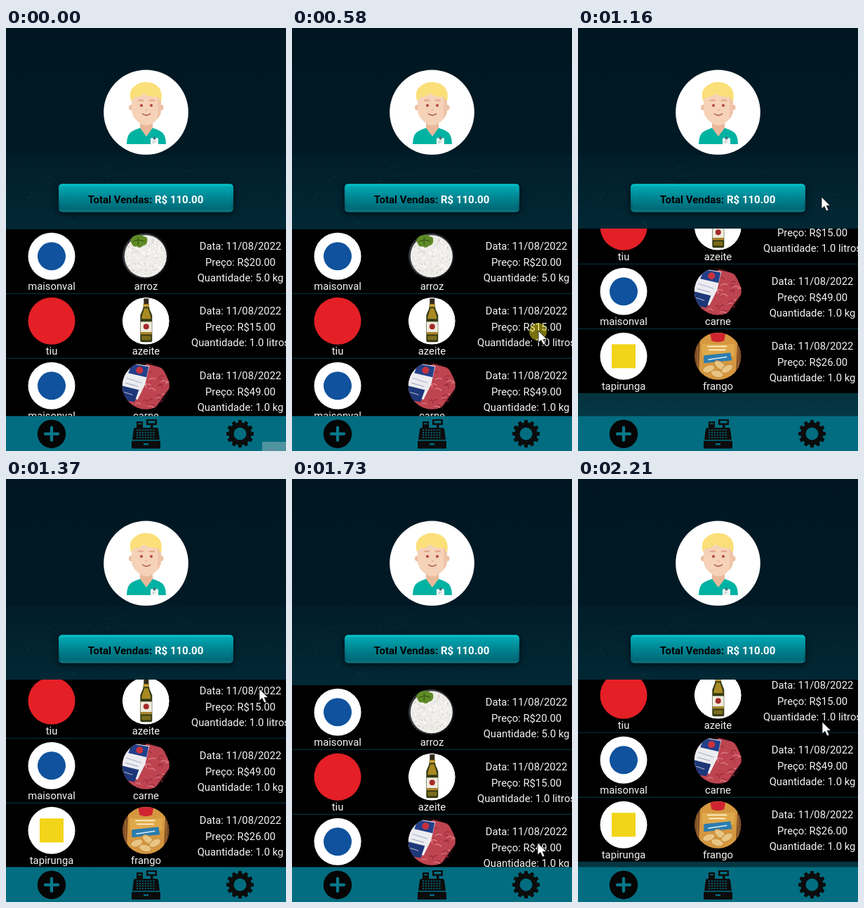
Animation of 399 by 601 pixels, one loop 2240 ms. Source, as an HTML page:

```html
<!DOCTYPE html>
<html lang="pt">
<head>
<meta charset="utf-8">
<title>Vendas</title>
<style>
html, body { margin: 0; width: 100%; height: 100%; overflow: hidden; background: #001722; }
svg { display: block; width: 399px; height: 601px; }
text { font-family: Roboto, "Noto Sans", sans-serif; font-size: 14.8px; fill: #f4f4f4; text-anchor: middle; white-space: pre; }
.total { font-size: 15px; font-weight: 700; fill: #fff; }
</style>
</head>
<body>
<svg id="stage" viewBox="0 0 399 601" width="399" height="601"></svg>
<script>
const LOOP = 2240, ROW = 92, LIST_TOP = 286;

// Waypoints: time followed by values
const scrollPath = [
  [0, 0], [870, 0], [960, -58], [1050, -118], [1110, -137], [1160, -134],
  [1230, -114], [1300, -103], [1370, -101], [1430, -84], [1560, 6], [1640, 20],
  [1690, 14], [1730, 7], [1790, 0], [1880, 0], [2000, -55], [2110, -100], [2210, -109], [2240, -110]
];
const cursorPath = [
  [0, 410, 612], [30, 400, 600], [210, 372, 520], [420, 352, 436], [540, 351, 430],
  [580, 351, 430], [830, 348, 428], [870, 348, 426], [960, 347, 368], [1100, 347, 239],
  [1160, 347, 240], [1260, 356, 262], [1370, 361, 298], [1430, 359, 320], [1640, 351, 505],
  [1730, 350, 517], [1880, 350, 515], [2000, 349, 450], [2110, 348, 376], [2210, 348, 345], [2240, 348, 342]
];

function sample(path, t) {
  let i = 1;
  while (i < path.length - 1 && path[i][0] < t) i++;
  const a = path[i - 1], b = path[i];
  const k = Math.min(1, Math.max(0, (t - a[0]) / (b[0] - a[0])));
  return a.slice(1).map((v, j) => v + (b[j + 1] - v) * k);
}

function random(seed) {
  return () => (seed = (seed * 16807) % 2147483647) / 2147483647;
}

const circle = (x, y, r, fill, extra = '') => `<circle cx="${x}" cy="${y}" r="${r}" fill="${fill}" ${extra}/>`;
const rect = (x, y, w, h, fill, extra = '') => `<rect x="${x}" y="${y}" width="${w}" height="${h}" fill="${fill}" ${extra}/>`;
const path = (d, fill, extra = '') => `<path d="${d}" fill="${fill}" ${extra}/>`;
const line = (d, stroke, width, extra = '') => `<path d="${d}" fill="none" stroke="${stroke}" stroke-width="${width}" ${extra}/>`;
const label = (x, y, s) => `<text x="${x}" y="${y}">${s}</text>`;
const gradient = (id, stops) => `<linearGradient id="${id}" x1="0" y1="0" x2="0" y2="1">` +
  stops.map(([o, c]) => `<stop offset="${o}" stop-color="${c}"/>`).join('') + '</linearGradient>';

// Products are drawn around (0, 0) inside a disc of radius 33.5
function rice() {
  const rnd = random(71);
  let s = circle(0, 0, 33.5, '#090a0c') + circle(-1.5, -.5, 32, '#35383c') + circle(-.5, 0, 30, '#eeece8');
  for (let i = 0; i < 150; i++) {
    const a = rnd() * 6.283, r = Math.sqrt(rnd()) * 28, tilt = rnd() * 6.283;
    const x = r * Math.cos(a), y = r * Math.sin(a);
    const dx = 2.4 * Math.cos(tilt), dy = 2.4 * Math.sin(tilt);
    s += line(`M${x.toFixed(1)} ${y.toFixed(1)}l${dx.toFixed(1)} ${dy.toFixed(1)}`,
      ['#fff', '#fafaf6', '#d5d2ca'][i % 3], 1.2, 'stroke-linecap="round"');
  }
  return s + path('M-22-22q2-8 10-8q6-2 9 2q6 0 5 6q0 6-6 7q-4 5-9 1q-6 2-9-8z', '#5f8a26') +
    line('M-18-21q8-4 16 0m-9-6v11', '#35590f', 1.2);
}

function oil() {
  return circle(0, 0, 33.5, '#fff') +
    path('M-3.500-24h8q0 7 2.500 11l2 5v36q0 2-2.500 2h-12q-2.500 0-2.500-2v-36l2-5q2.500-4 2.500-11z', '#353a14') +
    path('M-2-18h5l3 9q1 3 1 6h-13q0-3 1-6z', '#a98a22') +
    rect(-3, -32, 7, 9, '#33291a') + rect(-3.5, -24, 8, 4, '#c79c34') +
    rect(-7.5, 1, 16, 15, '#efebdc') + circle(.5, 8, 4, '#a52b2b') +
    rect(-7.5, 16, 16, 3, '#b18a2c') + rect(-6, 21, 13, 6, '#7c6c1c');
}

function meat() {
  const rnd = random(19);
  let s = circle(0, 0, 33.5, '#16080b') + path('M-34-14L2-31L24-25L36 0L10 36L-34 30z', '#bd4450');
  for (let i = 0; i < 40; i++) {
    const x = rnd() * 62 - 28, y = rnd() * 52 - 20;
    s += line(`M${x.toFixed(1)} ${y.toFixed(1)}q5-4 ${(5 + rnd() * 6).toFixed(1)} ${(rnd() * 7 - 2).toFixed(1)}`,
      i % 2 ? '#df818a' : '#9c2a3a', 1.2);
  }
  return s + path('M-34-13L-21-32L5-28L-1-2L-12 20L-34 8z', '#ececf0') +
    path('M-20-31L4-27L1-12L-25-18z', '#233f8a') + circle(-9, -22, 5, '#c8323c') +
    path('M-34 0L-10 6L-16 23L-34 20z', '#1d3779') +
    line('M-28-11l22 7m-23 0l18 5m-20 8l12 4', '#a9b2cc', 1.2);
}

function chicken() {
  return circle(0, 0, 33.5, '#7a4a26') + path('M-25-34h50l3 10-2 44-3 14h-46l-4-16z', '#d5973f') +
    path('M-23-17h47l-1 17h-45z', '#dfa94b') +
    path('M-20-1L18-5l2 11L-20 10z', '#2c7cae') + path('M-11-33h22l-2 11q-9 4-18 0z', '#cf2430') +
    line('M-15-14h28m-26 5h24', '#fff2ce', 1.8) + line('M-14 5l27-4', '#d9edf5', 1.4) +
    [[-13, 18, -20], [3, 13, 35], [13, 18, -30], [-1, 25, 15]].map(([x, y, a]) =>
      `<ellipse cx="${x}" cy="${y}" rx="9" ry="5" fill="#e9c583" stroke="#c48c3e" transform="rotate(${a} ${x} ${y})"/>`).join('') +
    line('M-29-15v38m58-36v40', '#9b642f', 2);
}

const white = circle(0, 0, 33.5, '#fff');
const blueMark = white + circle(0, 0, 20, '#10529d');
const redMark = circle(0, 0, 33.5, '#e41f26');
const yellowMark = white + rect(-17, -17, 34, 34, '#f2d418');

const sales = [
  ['maisonval', blueMark, 'arroz', rice(), '20.00', '5.0 kg'],
  ['tiu', redMark, 'azeite', oil(), '15.00', '1.0 litros'],
  ['maisonval', blueMark, 'carne', meat(), '49.00', '1.0 kg'],
  ['tapirunga', yellowMark, 'frango', chicken(), '26.00', '1.0 kg']
];

function saleRow([shop, mark, item, picture, price, amount], i) {
  return `<g transform="translate(0 ${i * ROW})">` + rect(0, 0, 399, 90.7, '#000') +
    `<g transform="translate(65 38.3)">${mark}</g>` +
    `<g transform="translate(199.3 38.3)" clip-path="url(#disc)">${picture}</g>` +
    label(65, 86, shop) + label(199.5, 86, item) +
    label(334, 29.3, 'Data: 11/08/2022') + label(334, 52, 'Preço: R$' + price) +
    label(334, 74.3, 'Quantidade: ' + amount) + '</g>';
}

function background() {
  const rnd = random(5);
  let s = rect(0, 0, 399, 180, 'url(#night)') + rect(0, 180, 399, 421, 'url(#glow)');
  for (let i = 0; i < 18; i++) {
    const x = rnd() * 399, y = 195 + rnd() * 90;
    s += line(`M${x.toFixed(0)} ${y.toFixed(0)}l${(rnd() * 80 - 40).toFixed(0)} ${(rnd() * 36 - 18).toFixed(0)}`,
      '#1c6573', .7, 'opacity=".14"') + circle(x.toFixed(0), y.toFixed(0), 1, '#267786', 'opacity=".2"');
  }
  return s;
}

function avatar() {
  return circle(199.5, 119.7, 60.3, '#fff') +
    circle(179, 113, 4, '#edbd9f') + circle(220.5, 113, 4, '#edbd9f') +
    path('M191 130h18v14l-9 10l-9-10z', '#e9b899') +
    path('M179 94h42v22q0 9-7 15q-7 7.500-14 7.500t-14-7.500q-7-6-7-15z', '#f5d2b8') +
    path('M221 94h-5v35q5-5 5-13z', '#efc4a8') +
    path('M178 104q-4-16 6-22q8-6 18-5q13 1 18 11q3 7 1 16q-3-1-4-6q-12 1-21-5q-5 6-12 5q-4 2-6 6z', '#fbdf79') +
    line('M188 103.500q4-2 8 0m8 0q4-2 8 0', '#e3a08b', 1.8) +
    circle(193, 110, 2.1, '#b34843') + circle(207, 110, 2.1, '#b34843') +
    line('M198.500 116.500h3', '#e3a98d', 1.5) + line('M194 121.500q6 5 12 0', '#a55248', 1.3) +
    path('M172 165q0-15 9-19q4-2 10-4l9 12l9-12q6 2 10 4q9 4 9 19z', '#00b2a2') +
    rect(206, 156.5, 11, 8.5, '#f6f8f8') + rect(210, 154.5, 3, 4, '#496b78') +
    line('M208.500 161h5m-5 2h3', '#8ca9b0', .8);
}

function totalButton() {
  return rect(74, 224, 251, 41, '#000', 'rx="5" opacity=".5" filter="url(#soft)"') +
    rect(75, 221.5, 249, 40, 'url(#bevel)', 'rx="5"') +
    rect(77.5, 224.5, 244, 33.5, 'url(#button)', 'rx="3"') +
    '<text class="total" x="199" y="249"><tspan fill="#000">Total Vendas: </tspan>R$ 110.00</text>';
}

function register() {
  const black = '#0c0c0c', gap = '#026d80';
  let s = rect(200, 556, 15, 8, black, 'rx="1"') + rect(202.5, 558, 10, 3.5, gap) + rect(206, 564, 3.5, 5, black) +
    path('M186 569v-10h9v10z', black) + rect(188, 561.5, 5, 1.5, gap) +
    path('M184 568h31q1.500 0 2 2l2 15h-39l2-15q.5-2 2-2z', black) +
    rect(179, 586.5, 41, 11, black, 'rx="1.500"') + rect(196, 590, 7, 2.5, gap);
  for (let r = 0; r < 4; r++)
    for (let c = 0; c < 7; c++)
      s += rect(186 + c * 3.9, 570.5 + r * 3.5, 2.1, 1.6, gap);
  return s;
}

function gear() {
  let s = circle(333.5, 576.5, 12.5, 'none', 'stroke="#0c0c0c" stroke-width="7"');
  for (let i = 0; i < 12; i++)
    s += path('M-3.200-14L-2.200-19.500H2.200L3.200-14z', '#0c0c0c', `transform="translate(333.500 576.500) rotate(${i * 30})"`);
  return s;
}

function toolbar() {
  return rect(0, 551.5, 399, 49.5, '#026d80') + circle(65, 576.7, 20.2, '#050505') +
    line('M56 576.700h18m-9-9v18', '#08798b', 4.3, 'stroke-linecap="round"') + register() + gear();
}

document.getElementById('stage').innerHTML = '<defs>' +
  gradient('night', [[0, '#001722'], [1, '#001924']]) +
  gradient('glow', [[0, '#011d29'], [.25, '#022835'], [.8, '#04313d'], [1, '#05404c']]) +
  gradient('bevel', [[0, '#06cfd4'], [.12, '#00a5b0'], [.85, '#005c69'], [1, '#107c89']]) +
  gradient('button', [[0, '#00a9b4'], [.5, '#008592'], [1, '#006876']]) +
  '<filter id="soft" x="-10%" y="-40%" width="120%" height="180%"><feGaussianBlur stdDeviation="4"/></filter>' +
  '<clipPath id="view"><rect y="285" width="399" height="266.500"/></clipPath>' +
  '<clipPath id="disc"><circle r="33.500"/></clipPath></defs>' +
  background() + avatar() + totalButton() +
  `<g clip-path="url(#view)"><g id="list">${sales.map(saleRow).join('')}</g></g>` + toolbar() +
  `<g id="corner">${rect(365, 588, 34, 13, '#4f93a0')}<text x="377" y="608" style="fill:#6f858b">C</text></g>` +
  circle(350.5, 431.5, 12.5, '#ffee20', 'id="press"') +
  `<g id="cursor">${path('M0 0V17L4 13.500L7 20L10 18.700L7.200 12.500H12.500Z', '#fff', 'stroke="#111" stroke-width=".8"')}</g>`;

const list = document.getElementById('list');
const corner = document.getElementById('corner');
const press = document.getElementById('press');
const cursor = document.getElementById('cursor');

function draw(t) {
  const [offset] = sample(scrollPath, t);
  const [x, y] = sample(cursorPath, t);
  list.setAttribute('transform', `translate(0 ${LIST_TOP + Math.round(offset)})`);
  cursor.setAttribute('transform', `translate(${Math.round(x)} ${Math.round(y)})`);
  corner.setAttribute('visibility', t < 30 ? 'visible' : 'hidden');
  cursor.setAttribute('visibility', t < 30 ? 'hidden' : 'visible');
  const fade = t < 540 ? 0 : Math.max(0, Math.min(1, (760 - t) / 140));
  press.setAttribute('opacity', .48 * fade);
}

const start = performance.now();
function tick() {
  draw((performance.now() - start) % LOOP);
  requestAnimationFrame(tick);
}
tick();
</script>
</body>
</html>
```
